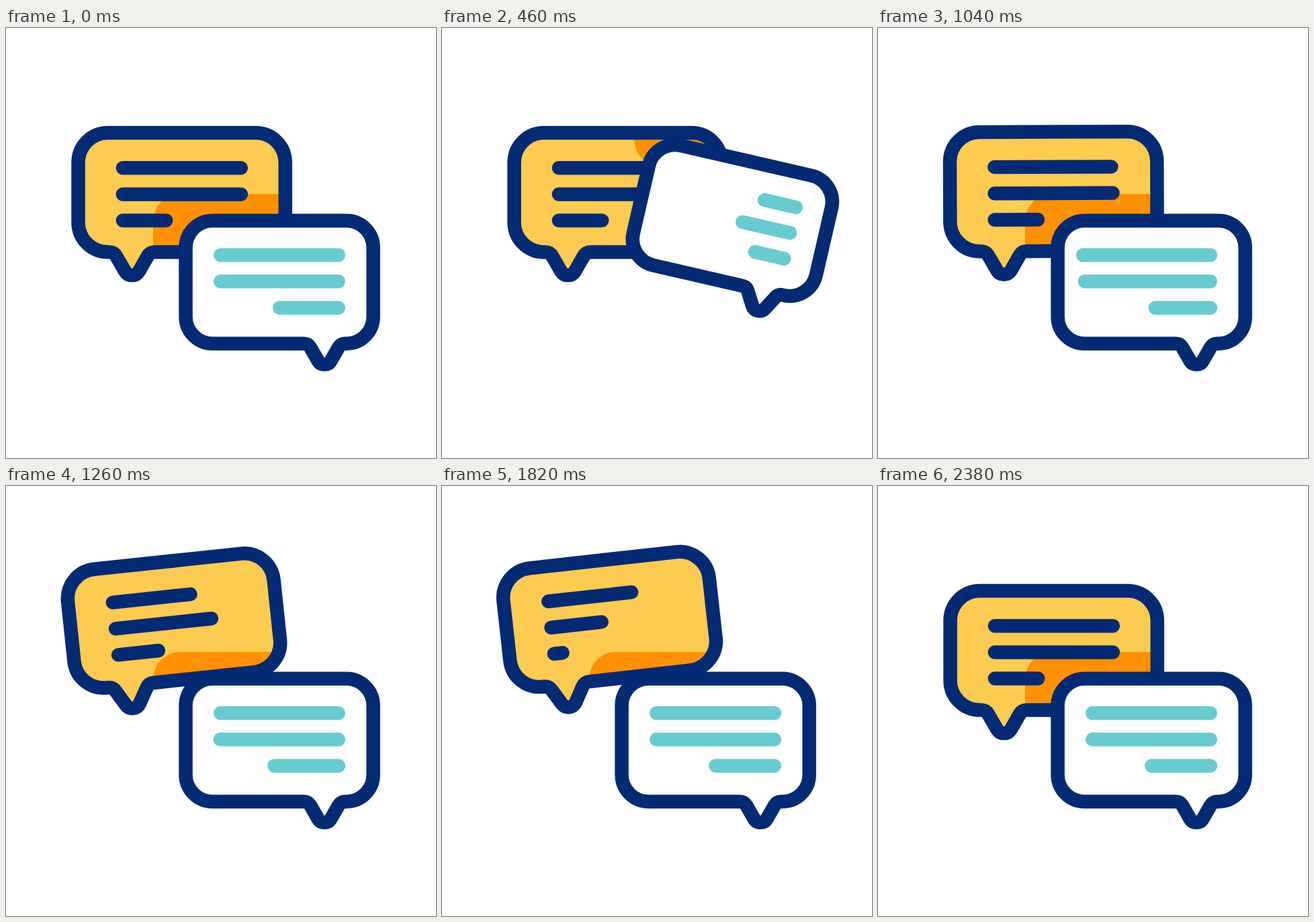
Recreate the animation shown at these times as an HTML page. Size 640 by 640 pixels, loop 2.42 s.

```html
<!DOCTYPE html>
<html>
<head>
<meta charset="utf-8">
<style>
  html, body { margin: 0; height: 100%; overflow: hidden; background: #fff; }
  svg { display: block; width: 100%; height: 100%; }
  .outline, .lines { stroke: #032a75; stroke-width: 20.5; fill: none; stroke-linecap: round; }
  #front .lines { stroke: #67ccd1; }
</style>
</head>
<body>
<svg viewBox="0 0 640 640">
  <clipPath id="clip"><path class="backShape"/></clipPath>
  <path class="backShape" fill="#fdcb50"/>
  <g clip-path="url(#clip)">
    <rect id="shadow" x="219" y="247" width="279" height="183" rx="40" fill="#ff9100"/>
  </g>
  <g id="back">
    <path class="backShape outline"/>
    <path class="lines"/>
  </g>
  <g id="front">
    <path class="outline" style="fill:#fff"/>
    <path class="lines"/>
  </g>
</svg>
<script>
const LOOP = 2420, RISE = 600, FALL = 400, SETTLE = 200, STAGGER = 80;
const $ = selector => document.querySelector(selector);

const ease = x => {
  x = Math.min(1, Math.max(0, x));
  return x * x * (3 - 2 * x);
};
const mix = (a, b, k) => a + (b - a) * k;

// Rounded box with a soft 60° tail pointing down at tailX
function bubblePath(left, top, right, bottom, r, tailX, tailH, tailR) {
  const side = tailR * Math.sqrt(3) / 2, half = tailR / 2;
  const slope = (tailH - tailR) / Math.sqrt(3);
  const reach = 2 * side + slope;
  const corner = (x, y) => `a${r} ${r} 0 0 1 ${x} ${y}`;
  const bend = (sweep, x, y) => `a${tailR} ${tailR} 0 0 ${sweep} ${x} ${y}`;
  return `M${left + r} ${top}H${right - r}${corner(r, r)}V${bottom - r}${corner(-r, r)}` +
    `H${tailX + reach}${bend(0, -side, half)}l${-slope} ${tailH - tailR}` +
    `${bend(1, -2 * side, 0)}l${-slope} ${tailR - tailH}${bend(0, -side, -half)}` +
    `H${left + r}${corner(-r, -r)}V${top + r}${corner(r, -r)}Z`;
}

// 0 at rest, 1 at the top of the hop
const hop = t => t < RISE ? ease(t / RISE) : ease((RISE + FALL - t) / FALL);

// A line shrinks, grows past its full length, then settles
function lineLength(t, full, short, over) {
  if (t < RISE) return mix(full, short, ease(t / RISE));
  if (t < RISE + FALL) return mix(short, full + over, ease((t - RISE) / FALL));
  return mix(full + over, full, ease((t - RISE - FALL) / SETTLE));
}

const linesPath = (t, x, y, dir, over, sizes) => sizes.map(([full, short], i) =>
  `M${x} ${y + i * 39.2}h${dir * lineLength(t - i * STAGGER, full, short, over)}`).join('');

const pose = (p, angle, x, y) => `translate(0 ${-92 * p}) rotate(${angle * p} ${x} ${y})`;

const backShapes = document.querySelectorAll('.backShape');
const backPath = bubblePath(107.5, 156, 415.7, 333.5, 44, 187.5, 34.5, 12);
backShapes.forEach(el => el.setAttribute('d', backPath));
$('#front .outline').setAttribute('d', bubblePath(267.5, 286.8, 546.6, 469.7, 40, 474, 31.1, 11));

function draw(now) {
  const t = now % LOOP, later = t - 1000;
  const frontHop = hop(t), backPose = pose(hop(later), -15, 187.5, 351);

  $('#front').setAttribute('transform', pose(frontHop, 15, 474, 483));
  $('#shadow').setAttribute('transform', pose(frontHop, 30, 606, 464));
  backShapes.forEach(el => {
    if (!el.closest('#back')) el.setAttribute('transform', backPose);
  });
  $('#back').setAttribute('transform', backPose);

  $('#front .lines').setAttribute('d',
    linesPath(t, 494.8, 338, -1, 16, [[175.6, 28], [175.6, 28], [87.6, 2]]));
  $('#back .lines').setAttribute('d',
    linesPath(later, 173.8, 208.2, 1, 19, [[176, 28], [176, 28], [64.4, 8]]));
  requestAnimationFrame(draw);
}
requestAnimationFrame(draw);
</script>
</body>
</html>
```
